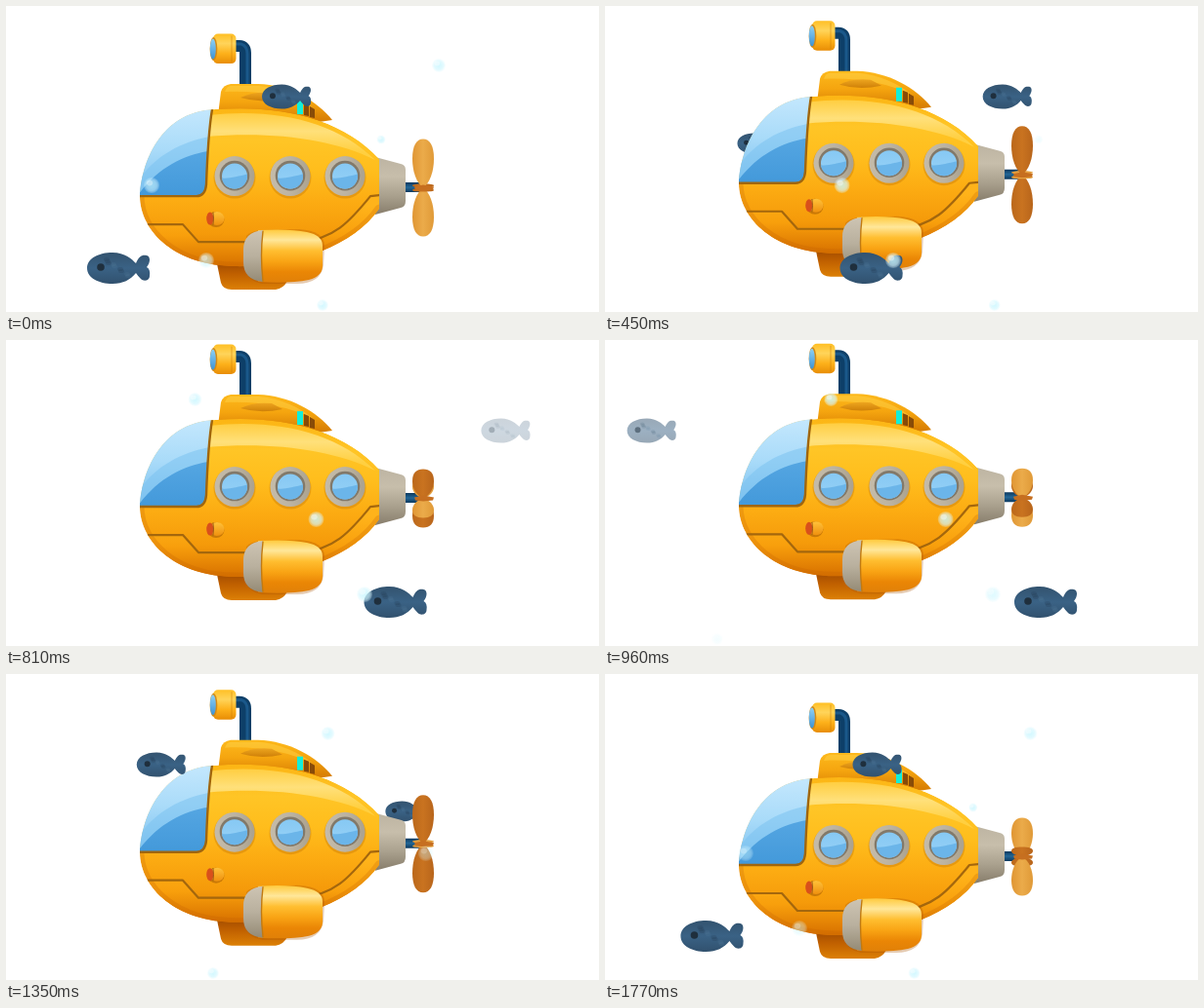
These frames come from a looping animation (607 px wide and 314 px high, 1800 ms). An HTML page with a canvas:

```html
<!DOCTYPE html>
<html lang="en">
<head>
<meta charset="utf-8">
<title>Submarine</title>
<style>
html, body { margin: 0; width: 100%; height: 100%; overflow: hidden; background: #fff; }
canvas { display: block; }
</style>
</head>
<body>
<canvas id="stage" width="607" height="314"></canvas>
<script>
const g = document.getElementById('stage').getContext('2d');
const LOOP = 1800, STEP = 30;

// x is the place at time 0; before is the speed up to then, after the speed from then on.
// Each drifter lives from `from` to `to` and fades at both ends.
const lowFish = { x: 83, y: 269, size: 64, before: .185, after: .35, from: -420, to: 1310 };
const highFish = { x: 262, y: 93, size: 50, before: .285, after: .277, from: -900, to: 870 };
const backFish = { x: 9, y: 141, size: 42, before: .281, after: .281, from: 0, to: 1750 };
const backBubble = { x: 384, y: 137, size: 4.5, before: .24, after: .133, from: -450, to: 540 };
const bubbles = [
  { x: 443, y: 61, size: 7, before: .252, after: .11, from: -1200, to: 420 },
  { x: 324, y: 307, size: 6, before: .249, after: .166, from: -870, to: 800 },
  { x: 149, y: 184, size: 8, before: .17, after: .208, from: -100, to: 1470 },
  { x: 205, y: 261, size: 8, before: .2, after: .2, from: -100, to: 1140 }
];

function place(d, t, draw) {
  if (t > d.to) t -= LOOP;
  const alpha = Math.min(1, (t - d.from) / 120, (d.to - t) / 240);
  if (alpha <= 0) return;
  g.save();
  g.globalAlpha = alpha;
  g.translate(d.x + t * (t < 0 ? d.before : d.after), d.y);
  draw(d.size);
  g.restore();
}

// Rises for 930 ms from just before the loop point, then sinks back.
function bob(t) {
  const u = (t + STEP) % LOOP;
  return 1 - 27.6 * Math.min(u / 930, (LOOP - u) / 870);
}

function blend(grad, colors) {
  colors.forEach((c, i) => grad.addColorStop(i / (colors.length - 1), c));
  return grad;
}
const down = (y0, y1, ...c) => blend(g.createLinearGradient(0, y0, 0, y1), c);
const across = (x0, x1, ...c) => blend(g.createLinearGradient(x0, 0, x1, 0), c);
const glow = (r, ...c) => blend(g.createRadialGradient(0, 0, 0, 0, 0, r), c);

function shape(d, fill) {
  g.fillStyle = fill;
  g.fill(new Path2D(d));
}
function line(d, color, width) {
  g.strokeStyle = color;
  g.lineWidth = width;
  g.lineJoin = g.lineCap = 'round';
  g.stroke(new Path2D(d));
}
function oval(x, y, rx, ry, fill) {
  g.fillStyle = fill;
  g.beginPath();
  g.ellipse(x, y, rx, ry, 0, 0, 7);
  g.fill();
}
function box(x, y, w, h, r, fill) {
  g.fillStyle = fill;
  g.beginPath();
  g.roundRect(x, y, w, h, r);
  g.fill();
}
function inside(d, draw) {
  g.save();
  g.clip(new Path2D(d));
  draw();
  g.restore();
}

function fish(size) {
  g.scale(size / 64, size / 64);
  shape('M0 0C0-10 12-16 26-16C39-16 46-9 50-5C53-12 56-14 61-13C65-12 65-6 61-1Q65 1 64 8C64 13 58 14 55 11Q52 8 50 5C44 12 37 16 26 16C12 16 0 10 0 0Z',
    down(-16, 16, '#33536f', '#3a6285', '#31516e'));
  for (let i = 0; i < 9; i++) {
    oval(20 + i * 7 % 27, -9 + i * 5 % 18, 3, 2, i % 2 ? 'rgba(80,120,150,.25)' : 'rgba(35,60,85,.25)');
  }
  oval(14, -1, 3.8, 3.8, '#1f2f3d');
}

function bubble(r) {
  oval(0, 0, r, r, glow(r, 'rgba(200,246,255,.8)', 'rgba(205,247,255,.75)', 'rgba(212,247,255,.65)', 'rgba(225,250,255,.2)'));
  oval(-r * .25, -r * .3, r * .4, r * .35, 'rgba(255,255,255,.4)');
}

function blade(dir, len, light) {
  g.save();
  g.scale(1, dir * Math.max(len, .08));
  shape('M0 0C-7-5-11-17-11-30C-11-43-7-50 0-50C7-50 11-43 11-30C11-17 7-5 0 0Z',
    light ? across(-11, 11, '#e09634', '#ebab4a', '#e09a38') : across(-11, 11, '#bb681b', '#c97320', '#b8651b'));
  g.restore();
}

// Two crossed blade pairs seen from the side; the nearer one is drawn last.
function propeller(t) {
  const phase = t % 300 / 300, light = Math.abs(1 - 2 * phase);
  g.save();
  g.translate(427, 186.5);
  for (const dir of [1, -1]) {
    const lightNear = (dir < 0) !== (phase < .5);
    blade(dir, lightNear ? 1 - light : light, !lightNear);
    blade(dir, lightNear ? light : 1 - light, lightNear);
  }
  shape('M-9-1L0-3L11-1L10 2L0 3L-8 2Z', '#c66f20');
  g.restore();
}

function porthole(x) {
  oval(x, 176, 21.5, 21.5, 'rgba(180,100,0,.3)');
  oval(x, 174.5, 20.5, 20.5, across(x - 20, x + 20, '#c4bba9', '#bdb4a2', '#aba28f'));
  oval(x, 174, 15.3, 15.3, '#82796a');
  oval(x, 174.5, 13, 13, down(161, 188, '#86c8f3', '#98d2f7'));
  g.save();
  g.translate(x, 174.5);
  shape('M-13 2C-6 3 4 0 13-2C14 7 7 13 0 13C-7 13-12 9-13 2Z', '#6bb5e9');
  g.restore();
}

const hull = 'M137 195C139 155 162 107 215 106C280 101 345 115 382 157L382 208C356 246 295 268 235 267C175 267 137 232 137 195Z';
const seam = 'M144 224L181 224L197 242L300 242C335 240 352 221 373 195L383 194';

function periscope() {
  line('M233 41L239 41Q245 41 245 48L245 82', '#0d3f68', 12);
  line('M236 39L241 39Q247 41 247 49L247 80', '#1a588a', 3);
  box(212, 28.5, 23.5, 30.5, 5, down(28, 59, '#ffbe22', '#ffd45a', '#fdb11a', '#e88d06'));
  line('M231 31L231 57', 'rgba(200,120,0,.5)', 1);
  oval(212.5, 44, 3.8, 12, '#d28a18');
  oval(211.8, 44, 3, 10.5, down(33, 55, '#8ed2f8', '#3e92d3'));
}

function cabin() {
  shape('M217 112L220 88Q222 81 230 80L258 80C290 81 318 97 334 117L300 122Z', down(80, 116, '#fdb91c', '#f5a50f', '#d98004'));
  shape('M230 82L258 82C282 84 300 93 314 104C290 92 255 86 224 88Q226 82 230 82Z', 'rgba(255,210,70,.5)');
  shape('M240 94Q254 87 272 89L283 95Q260 100 240 94Z', down(88, 98, '#f0a820', '#cc7d06'));
  box(298, 97, 6, 14, 0, '#12eed9');
  shape('M305 100L310 102L310 113L305 112Z', '#884b08');
  shape('M311 103L316 106L316 115L311 114Z', '#884b08');
}

function cockpit() {
  shape('M130 100L211 100C207 130 206 155 205 183Q204 195 195 195L130 195Z', down(107, 190, '#c3e7fd', '#a9dbf9', '#7fc2ef'));
  const corner = '207 150L205 183Q204 195 195 195L130 195Z';
  shape('M135 180C152 154 178 140 208 134L' + corner, 'rgba(125,195,240,.55)');
  shape('M135 194C155 167 180 153 207 149L' + corner, down(148, 195, '#55a6e2', '#4399da'));
  line('M136 195L195 195Q204 195 205 183C206 155 207 130 211 106', '#a0660e', 2.4);
}

function body() {
  shape(hull, down(105, 266, '#fcb514', '#ffc526', '#ffbd1c', '#fcab12', '#f59a0a', '#d97400'));
  shape('M207 112C275 104 338 118 378 158C335 136 270 128 205 134Z', down(107, 150, '#ffcb38', '#ffe07a', '#ffcf40'));
  shape(seam + 'L390 270L130 270L130 224Z', down(205, 266, '#ffb31a', '#f89f0c', '#d87200'));
  line('M137 195C137 232 175 267 235 267C295 268 356 246 382 208', 'rgba(195,95,0,.25)', 9);
  line(seam, '#a4670d', 2.2);
  cockpit();
}

function pod() {
  shape('M246 236Q250 231 262 230L300 229Q326 231 326 246L325 266Q322 285 298 285L262 285Q247 282 244 270Z', 'rgba(170,85,0,.3)');
  shape('M258 230Q290 228 308 232Q324 235 324 246L324 267Q324 277 310 281Q290 285 258 283Z',
    down(229, 284, '#ffc93a', '#ffe79a', '#ffbe30', '#f9a414', '#ea8605', '#e08008'));
  shape('M263 230Q243 232 243 250L243 263Q243 281 263 283Q260 256 263 230Z', down(230, 283, '#cdc4b3', '#b9b09e', '#948a75'));
  line('M263 231Q260 256 263 282', '#c17a12', 1.4);
}

function submarine(t) {
  shape('M214 255L220 284Q222 291 231 291L276 291Q284 290 288 282L300 255Z', down(258, 292, '#944300', '#c06000', '#de8206'));
  periscope();
  cabin();
  box(407, 181, 18, 10, 1, down(181, 191, '#0b385e', '#246796', '#0b385e'));
  propeller(t);
  shape('M378 155L404 162Q409 163 409 168L409 200Q409 206 404 207L378 214Z', down(155, 214, '#bdb4a2', '#c7beab', '#aaa18e', '#877d6b'));
  inside(hull, body);
  [234, 291, 347].forEach(porthole);
  oval(215, 219, 8.5, 8, '#c97907');
  oval(216, 218, 7.5, 7, down(211, 226, '#ffc23a', '#ee8d0b'));
  oval(208.8, 218, 3.6, 6.5, '#d9501b');
  line('M212 212Q213 218 212 224', '#9b5a14', 1);
  pod();
}

function frame(now) {
  const t = Math.floor(now % LOOP / STEP) * STEP;
  g.clearRect(0, 0, 607, 314);
  place(backFish, t, fish);
  place(backBubble, t, bubble);
  g.save();
  g.translate(0, bob(t));
  submarine(t);
  g.restore();
  place(lowFish, t, fish);
  place(highFish, t, fish);
  bubbles.forEach(b => place(b, t, bubble));
}

let begin;
function tick(now) {
  begin ??= now;
  frame(now - begin);
  requestAnimationFrame(tick);
}
frame(0);
requestAnimationFrame(tick);
</script>
</body>
</html>
```
